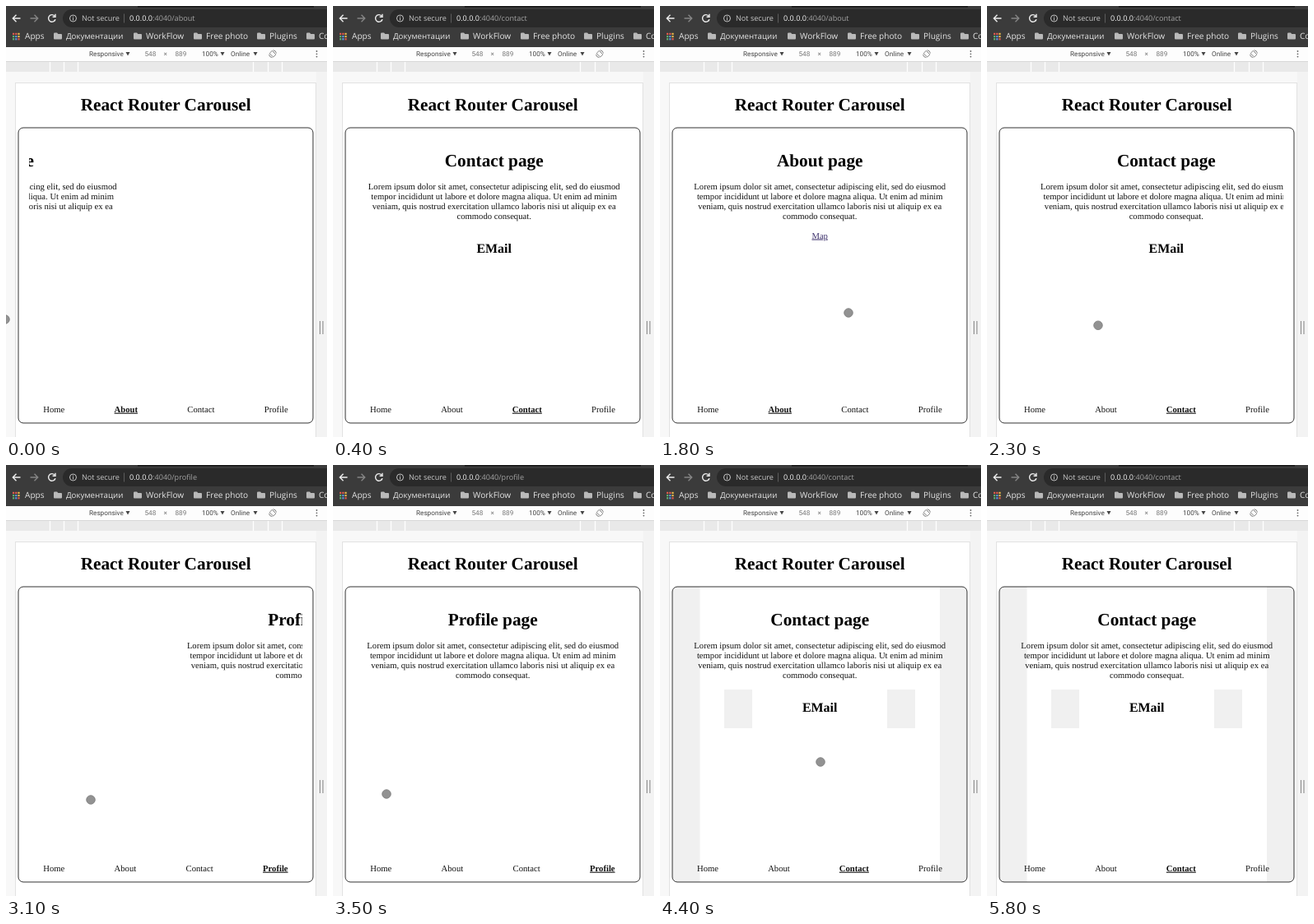
Recreate the animation shown at these times as an HTML page. Size 390 by 524 pixels, loop 6300 ms.

```html
<!DOCTYPE html>
<html lang="en">
<head>
<meta charset="utf-8">
<title>Carousel</title>
<style>
html, body { margin: 0; width: 100%; height: 100%; overflow: hidden; background: #f8f8f8; }
svg { display: block; width: 390px; height: 524px; text-rendering: geometricPrecision; }
.ui { font-family: "Open Sans", "Noto Sans", sans-serif; }
.tools { font: 8.2px Roboto, sans-serif; fill: #444; }
.page { font: 10.63px "Liberation Serif", "Times New Roman", serif; fill: #111; }
.h1 { font-size: 21.26px; font-weight: bold; fill: #000; }
.h2 { font-size: 15.94px; font-weight: bold; fill: #000; }
.mid { text-anchor: middle; }
.on { font-weight: bold; text-decoration: underline; }
</style>
</head>
<body>
<svg viewBox="0 0 390 524">
  <defs>
    <clipPath id="view"><rect x="28" y="149" width="332" height="325"/></clipPath>
    <clipPath id="inner"><rect x="15" y="148" width="358" height="359" rx="6"/></clipPath>
    <path id="folder" d="M0 1.2Q0 0 1.2 0H4L5.3 1.5H9Q10 1.5 10 2.5V7Q10 8 9 8H1Q0 8 0 7Z" fill="#b9b9b9"/>
    <path id="drop" d="M0 0H5L2.5 4.4Z" fill="#444"/>
  </defs>

  <rect width="390" height="524" fill="#f8f8f8"/>
  <g class="ui">
    <rect width="390" height="50" fill="#3b3b3b"/>
    <rect x="160" width="214" height="1.5" fill="#161616"/>
    <rect x="69" y="4" width="340" height="22" rx="11" fill="#2a2a2a"/>
    <g fill="none" stroke-width="1.4">
      <path d="M17.5 15H8.5M12.5 10.8L8.3 15L12.5 19.2" stroke="#eee"/>
      <path d="M29.5 15H38.5M34.5 10.8L38.7 15L34.5 19.2" stroke="#858585"/>
      <path d="M59 12A4.3 4.3 0 1 0 60 16.2M60 9.8V13.2H56.6" stroke="#eee"/>
      <g stroke="#c4c4c4" stroke-width="1"><circle cx="81.500" cy="15" r="4"/><path d="M81.500 14.300V17.400M81.500 12.500V13.500"/></g>
      <path d="M143.500 9.500V20.500" stroke="#5c5c5c" stroke-width="1"/>
    </g>
    <g font-size="9.1">
      <text x="92" y="18.200" fill="#c8c8c8">Not secure</text>
      <text x="150" y="18.200" fill="#f2f2f2">0.0.0.0<tspan id="url" fill="#a2a2a2"></tspan></text>
    </g>
    <g id="apps"></g>
    <g id="marks" font-size="10.1" fill="#e4e4e4"></g>
  </g>

  <g class="tools">
    <rect y="50" width="390" height="17" fill="#fdfdfd"/>
    <text x="101" y="61">Responsive</text><use href="#drop" x="145.500" y="56"/>
    <text x="168.500" y="61" fill="#777">548</text>
    <text x="191.500" y="61" fill="#777">×</text>
    <text x="205.500" y="61" fill="#777">889</text>
    <text x="238" y="61">100%</text><use href="#drop" x="260.500" y="56"/>
    <text x="273" y="61">Online</text><use href="#drop" x="300.500" y="56"/>
    <g fill="none" stroke="#777" stroke-width=".9">
      <rect x="321.700" y="55" width="4.600" height="6.500" rx=".6" transform="rotate(-45 324 58.200)"/>
      <path d="M324.500 53.700A4.500 4.500 0 0 1 328.500 57.500M323.500 62.700A4.500 4.500 0 0 1 319.500 59"/>
    </g>
    <g fill="#666"><circle cx="377.500" cy="55" r=".9"/><circle cx="377.500" cy="58.300" r=".9"/><circle cx="377.500" cy="61.600" r=".9"/></g>
    <rect y="67" width="390" height="13" fill="#e9e9e9"/>
    <path d="M0 67.500H390" stroke="#d8d8d8"/>
    <path d="M53.500 68V80M70.500 68V80M87.500 68V80M300.500 68V80M318.500 68V80M335.500 68V80" stroke="#fff" stroke-width="1.3"/>
  </g>

  <rect x="377" y="80" width="13" height="444" fill="#f3f3f3"/>
  <rect x="11.500" y="93.500" width="365" height="440" fill="#fff" stroke="#e2e2e2"/>
  <path d="M381.500 383V399M385 383V399" stroke="#8a8a8a" stroke-width="1.1"/>

  <g class="page">
    <text class="h1 mid" x="194.200" y="127.300">React Router Carousel</text>
    <g id="bars" fill="#f0f0f0">
      <g clip-path="url(#inner)"><rect x="15" y="148" width="33.500" height="359"/><rect x="340" y="148" width="33" height="359"/></g>
      <rect x="78" y="273" width="34" height="47"/><rect x="276" y="273" width="34" height="47"/>
    </g>
    <rect x="15" y="148" width="358" height="359" rx="6" fill="none" stroke="#333"/>
    <g clip-path="url(#view)">
      <g id="slide" class="mid">
        <text id="head" class="h1" x="194.200" y="195"></text>
        <g id="para"></g>
        <text id="mail" class="h2" x="194.200" y="300">EMail</text>
        <text id="map" x="194.200" y="282.500" fill="#41356f" text-decoration="underline">Map</text>
      </g>
    </g>
    <g id="nav"></g>
  </g>

  <circle id="touch" r="5.300" fill="#929292" stroke="#7c7c7c" stroke-width=".8"/>
  <g id="resize" fill="none" stroke="#222" stroke-width="1.1">
    <path d="M379.500 392H389M382 389.700L379.500 392L382 394.300M386.500 389.700L389 392L386.500 394.300"/>
  </g>
</svg>
<script>
const LOOP = 6300, STEP = 100, WIDTH = 332;
const $ = id => document.getElementById(id);

function add(parent, tag, attrs, text = "") {
  const el = document.createElementNS("http://www.w3.org/2000/svg", tag);
  for (const k in attrs) el.setAttribute(k, attrs[k]);
  el.textContent = text;
  return parent.appendChild(el);
}

["#e05a4e", "#e05a4e", "#e8b84a", "#5fae6b", "#5b93e0", "#e8b84a", "#5fae6b", "#5b93e0", "#e05a4e"]
  .forEach((fill, i) => add($("apps"), "rect", { x: 8 + i % 3 * 3.2, y: 32.8 + (i / 3 | 0) * 3.2, width: 2.2, height: 2.2, fill }));

[["Apps", 23], ["Документации", 73, 9.7], ["WorkFlow", 170], ["Free photo", 243], ["Plugins", 320], ["Code", 380]]
  .forEach(([name, x, size = 10.1], i) => {
    add($("marks"), "text", { x, y: 40.4, "font-size": size }, name);
    if (i) add($("marks"), "use", { href: "#folder", x: x - 15, y: 32.6 });
  });

["Lorem ipsum dolor sit amet, consectetur adipiscing elit, sed do eiusmod",
 "tempor incididunt ut labore et dolore magna aliqua. Ut enim ad minim",
 "veniam, quis nostrud exercitation ullamco laboris nisi ut aliquip ex ea",
 "commodo consequat."]
  .forEach((line, i) => add($("para"), "text", { x: 194.2, y: 223 + i * 12.1 }, line));

// plain and bold widths in em
const tabs = [["Home", 2.444, 2.556], ["About", 2.5, 2.667], ["Contact", 3.111, 3.388], ["Profile", 2.722, 2.888]];
const links = tabs.map(([name]) => add($("nav"), "text", { y: 493.7 }, name));

function setNav(active) {
  const widths = tabs.map(([name, plain, bold]) => 10.63 * (name === active ? bold : plain));
  const pad = (358 - widths.reduce((a, b) => a + b)) / 8;
  let x = 15 + pad;
  links.forEach((el, i) => {
    el.setAttribute("x", x);
    el.setAttribute("class", tabs[i][0] === active ? "on" : "");
    x += widths[i] + 2 * pad;
  });
}

// each swipe: start, page it brings, direction, time the address changes
const swipes = [
  [-80, "Contact", -1, 300],
  [1300, "About", 1, 1600],
  [1880, "Contact", -1, 2300],
  [2820, "Profile", -1, 3000],
  [3590, "Contact", 1, 4300]
];
const OUT = 200, IN = 300;
const easeOut = p => 1 - (1 - Math.min(1, p)) ** 2;

function pageAt(t) {
  let page = "About", url = "About", x = 0;
  for (const [start, next, dir, urlTime] of swipes) {
    if (t >= urlTime) url = next;
    if (t < start) continue;
    if (t < start + OUT) {
      x = dir * WIDTH * easeOut((t - start) / OUT);
    } else {
      page = next;
      x = -dir * WIDTH * (1 - easeOut((t - start - OUT) / IN));
    }
  }
  return { page, url, x };
}

// pointer path: time, x, y
const path = [
  [0, -1, 381], [100, -20, 381], [500, -12, 380], [700, 60, 378], [1100, 200, 373],
  [1400, 330, 372], [1600, 320, 372], [1800, 229, 373], [2000, 70, 380], [2200, 60, 385],
  [2600, 360, 398], [2800, 340, 400], [3100, 103, 407], [3300, 55, 405], [3500, 65, 400],
  [3800, 345, 393], [4200, 345, 385], [4300, 300, 373], [4400, 195, 361], [4900, 215, 385],
  [5000, 215, 390], [5500, 200.5, 469], [5600, 200.5, 469], [5700, 200.5, 487], [LOOP, 200.5, 487]
];

function pointerAt(t) {
  const i = path.findIndex(p => p[0] > t);
  const [t0, x0, y0] = path[i - 1], [t1, x1, y1] = path[i];
  const p = (t - t0) / (t1 - t0);
  return [x0 + (x1 - x0) * p, y0 + (y1 - y0) * p];
}

const show = (id, on) => $(id).setAttribute("visibility", on ? "visible" : "hidden");

function draw(t) {
  const { page, url, x } = pageAt(t);
  $("url").textContent = ":4040/" + url.toLowerCase();
  $("head").textContent = page + " page";
  $("slide").setAttribute("transform", `translate(${x.toFixed(2)} 0)`);
  show("mail", page === "Contact");
  show("map", page === "About");
  show("bars", t >= 800 && t < 1300 || t >= 4100);
  setNav(page);

  const [px, py] = pointerAt(t);
  const edge = t >= 3900 && t < 4300;
  $("touch").setAttribute("cx", px);
  $("touch").setAttribute("cy", py);
  show("touch", !edge && t < 5800);
  show("resize", edge);
}

const begin = performance.now();
function tick() {
  const t = (performance.now() - begin) % LOOP;
  draw(Math.floor(t / STEP) * STEP);
  requestAnimationFrame(tick);
}
tick();
</script>
</body>
</html>
```
